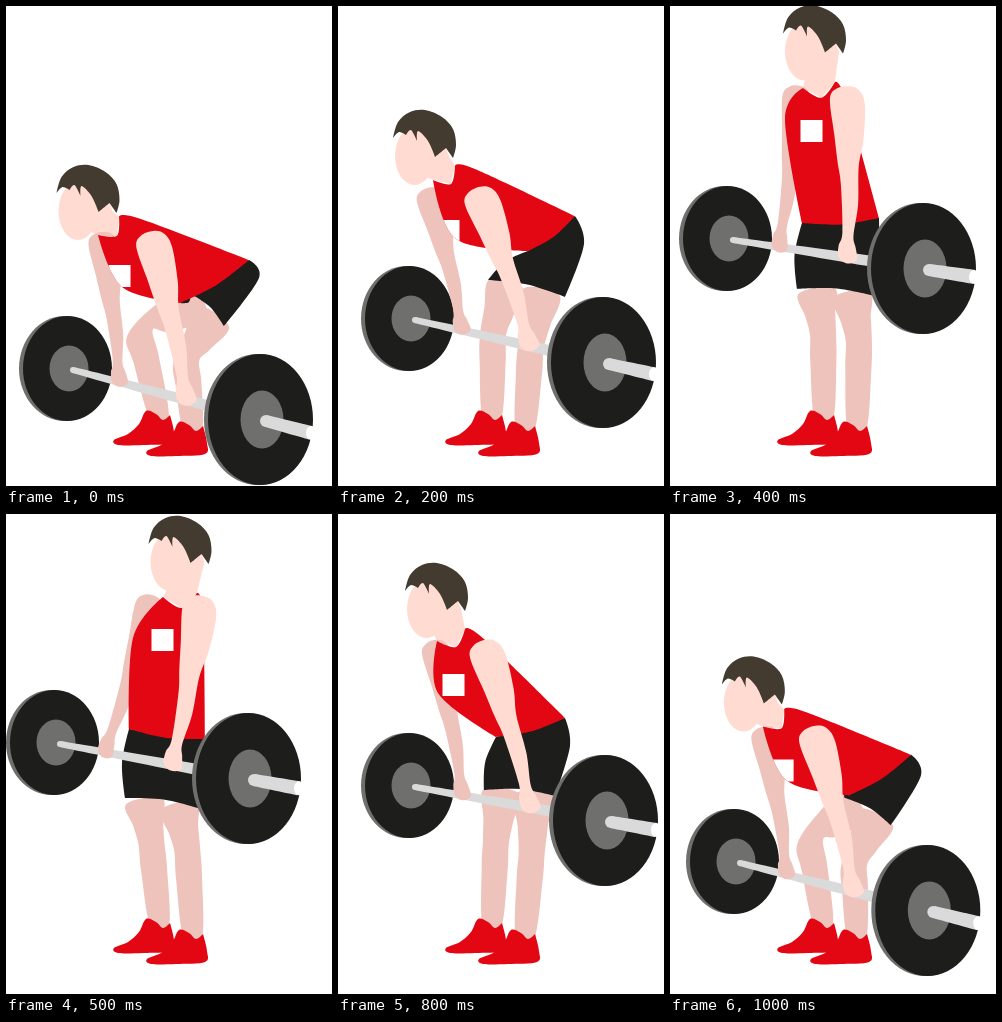
Recreate the animation shown at these times as an HTML page with a canvas. Size 326 by 480 pixels, loop 1100 ms.

```html
<!DOCTYPE html>
<html lang="en">
<head>
<meta charset="utf-8">
<title>Deadlift</title>
<style>
html, body { margin: 0; width: 100%; height: 100%; overflow: hidden; background: #fff; }
canvas { display: block; }
</style>
</head>
<body>
<canvas id="stage" width="326" height="480"></canvas>
<script>
const ctx = document.getElementById('stage').getContext('2d');
const SKIN = '#ffdbd1', SHADE = '#eec3bb', RED = '#e30613', BLACK = '#1d1d1b',
      HAIR = '#433b30', GREY = '#6f6f6e', STEEL = '#dadada';

// Joints of the key poses, from the floor to the lockout
const floor = {
  head: [-16.5, 110], farHub: [67, 364], hub: [260, 415], shoulder: [148, 247],
  nape: [113, 211], strap: [92, 229], chest: [116, 281], hem: [174, 297], back: [243, 254],
  seat: [253, 272], hemBack: [218, 320], hemFront: [185, 288], farKnee: [133, 322], knee: [180, 352]
};
const pull = {
  head: [-12, 55], farHub: [77, 314], hub: [271, 358], shoulder: [145, 202],
  nape: [117, 160], strap: [95, 174], chest: [118, 233], hem: [190, 245], back: [237, 210],
  seat: [246, 238], hemBack: [227, 291], hemFront: [150, 274], farKnee: [155, 325], knee: [193, 338]
};
const thigh = {
  head: [0, 0], farHub: [77, 273], hub: [273, 308], shoulder: [150, 148],
  nape: [127, 115], strap: [99, 127], chest: [100, 179], hem: [158, 223], back: [227, 204],
  seat: [232, 232], hemBack: [217, 282], hemFront: [146, 276], farKnee: [158, 325], knee: [194, 335]
};
const rise = {
  head: [46, -49.5], farHub: [63, 234], hub: [259, 264], shoulder: [176, 102],
  nape: [165, 76], strap: [133, 82], chest: [115, 113], hem: [132, 217], back: [209, 212],
  seat: [209, 250], hemBack: [205, 290], hemFront: [127, 283], farKnee: [153, 325], knee: [189, 332]
};
const lockout = {
  head: [75.5, -47], farHub: [54, 230], hub: [248, 266], shoulder: [191, 103],
  nape: [191, 79], strap: [157, 83], chest: [127, 124], hem: [123, 215], back: [199, 225],
  seat: [202, 258], hemBack: [195, 295], hemFront: [119, 284], farKnee: [145, 325], knee: [181, 332]
};

const add = ([x, y], dx, dy) => [x + dx, y + dy];
const lerp = (a, b, t) => [a[0] + (b[0] - a[0]) * t, a[1] + (b[1] - a[1]) * t];
const sharp = ([x, y]) => [x, y, true];

// Point at t between a and b, pushed sideways
function along(a, b, t, push) {
  const dx = b[0] - a[0], dy = b[1] - a[1], k = push / Math.hypot(dx, dy);
  return add(lerp(a, b, t), dy * k, -dx * k);
}

const mix = (p, q, t) =>
  Object.fromEntries(Object.keys(p).map(k => [k, lerp(p[k], q[k], t)]));
const lift = [floor, mix(floor, pull, 0.3), pull, thigh, rise, lockout];

// "x,y x,y!" -> points; "!" marks a sharp corner
const outline = s => s.split(' ').map(w => [...w.replace('!', '').split(',').map(Number), w.endsWith('!')]);
const hair = outline('67,77! 72,61 84,51 99,49 116,56 127,68 130,84 127,97! 120,87! 109,96! 102,80 92,70 91,80! 85,69 80,74! 73,71');
const shoe = outline('108,434 122,428 133,418 140,405 150,408 157,414 164,409! 168,426 166,437 137,439 112,439');
// Arm hanging from a shoulder at 0,0 to a hand at 0,147
const arm = outline('4,-22 -9,-20 -16,-9 -12,27 -9,55 -6,78 -5,126 -9,140 -9,152 -1,158 9,155 8,142 6,130 11,98 12,60 17,33 19,-2 14,-17');

function trace(list) {
  const n = list.length, at = i => list[(i + n) % n];
  const slope = (i, k) => at(i)[2] ? 0 : (at(i + 1)[k] - at(i - 1)[k]) / 6;
  ctx.beginPath();
  ctx.moveTo(list[0][0], list[0][1]);
  list.forEach((a, i) => {
    const b = at(i + 1);
    ctx.bezierCurveTo(a[0] + slope(i, 0), a[1] + slope(i, 1),
      b[0] - slope(i + 1, 0), b[1] - slope(i + 1, 1), b[0], b[1]);
  });
  ctx.closePath();
}

function blob(list, color, dx = 0, dy = 0) {
  trace(list.map(([x, y, s]) => [x + dx, y + dy, s]));
  ctx.fillStyle = color;
  ctx.fill();
}

function oval([x, y], rx, ry, color) {
  ctx.beginPath();
  ctx.ellipse(x, y, rx, ry, 0, 0, 7);
  ctx.fillStyle = color;
  ctx.fill();
}

// Tapered rod with a round start
function rod(a, b, w1, w2) {
  oval(a, w1 / 2, w1 / 2, STEEL);
  blob([along(a, b, 0, w1 / 2), along(a, b, 1, w2 / 2),
    along(a, b, 1, -w2 / 2), along(a, b, 0, -w1 / 2)].map(sharp), STEEL);
}

function plate(hub, rx, ry, capX, capY) {
  oval(add(hub, -8.5, -1.5), rx, ry, GREY);
  oval(add(hub, -5.5, -1.5), rx - 1, ry, BLACK);
  oval(add(hub, -4, -1.5), capX, capY, GREY);
}

function drawArm(from, to, width, color) {
  const dx = to[0] - from[0], dy = to[1] - from[1];
  ctx.save();
  ctx.translate(...from);
  ctx.rotate(Math.atan2(-dx, dy));
  ctx.scale(width, Math.hypot(dx, dy) / 147);
  blob(arm, color);
  ctx.restore();
}

function drawLeg(hip, knee, ankle) {
  const side = s => [along(hip, knee, 0, 18 * s), along(hip, knee, 0.6, 15 * s),
    along(knee, ankle, 0.05, 13 * s), along(knee, ankle, 0.35, 13 * s), along(knee, ankle, 1, 9 * s)];
  blob([...side(1), ...side(-1).reverse()], SHADE);
}

function draw(p) {
  ctx.fillStyle = '#fff';
  ctx.fillRect(0, 0, 326, 480);
  const { head, farHub, hub, shoulder, nape, strap, hem, back, hemBack, hemFront } = p;
  const farShoulder = add(shoulder, -51, -2);
  const grip = t => add(lerp(farHub, hub, t), 0, -5);
  const neckline = along(strap, nape, 0.5, -13);
  const shirt = [sharp(nape), along(nape, back, 0.15, 5), sharp(back),
    along(back, hem, 0.5, 4), sharp(hem), p.chest, sharp(strap), neckline];

  plate(farHub, 45.5, 52.5, 19.5, 23);
  drawLeg(lerp(hemFront, hemBack, 0.25), p.farKnee, [154, 414]);
  blob(shoe, RED);
  drawLeg(lerp(hemFront, hemBack, 0.7), p.knee, [187, 425]);
  blob(shoe, RED, 33, 11);
  blob([sharp(hem), sharp(back), p.seat, sharp(hemBack), along(hemBack, hemFront, 0.5, -4),
    sharp(hemFront), along(hemFront, hem, 0.5, 5)], BLACK);
  rod(farHub, hub, 6, 13);

  blob([add(head, 92, 112), add(head, 98, 75), add(head, 118, 82), add(head, 123, 95),
    nape, neckline, strap].map(sharp), SKIN);
  drawArm(farShoulder, grip(0.24), 0.85, SHADE);
  blob(shirt, RED);

  // Plain emblem, kept inside the shirt
  ctx.save();
  trace(shirt);
  ctx.clip();
  const [x, y] = add(lerp(shoulder, farShoulder, 0.5), -9, 24);
  ctx.fillStyle = '#fff';
  ctx.fillRect(x - 11, y - 11, 22, 22);
  ctx.restore();

  oval(add(head, 88.5, 95), 19.5, 29, SKIN);
  blob(hair, HAIR, ...head);
  drawArm(shoulder, grip(0.585), 1, SKIN);

  plate(hub, 53.5, 65.5, 21.5, 29);
  const tip = lerp(farHub, hub, 1 + 45 / (hub[0] - farHub[0]));
  rod(hub, tip, 12, 14);
  oval(tip, 5, 7, '#fff');
}

// Up through the poses, a short hold, and back down
function tick() {
  const step = Math.floor(performance.now() % 1100 / 100);
  draw(lift[Math.min(step, 11 - step)]);
  requestAnimationFrame(tick);
}
tick();
</script>
</body>
</html>
```
